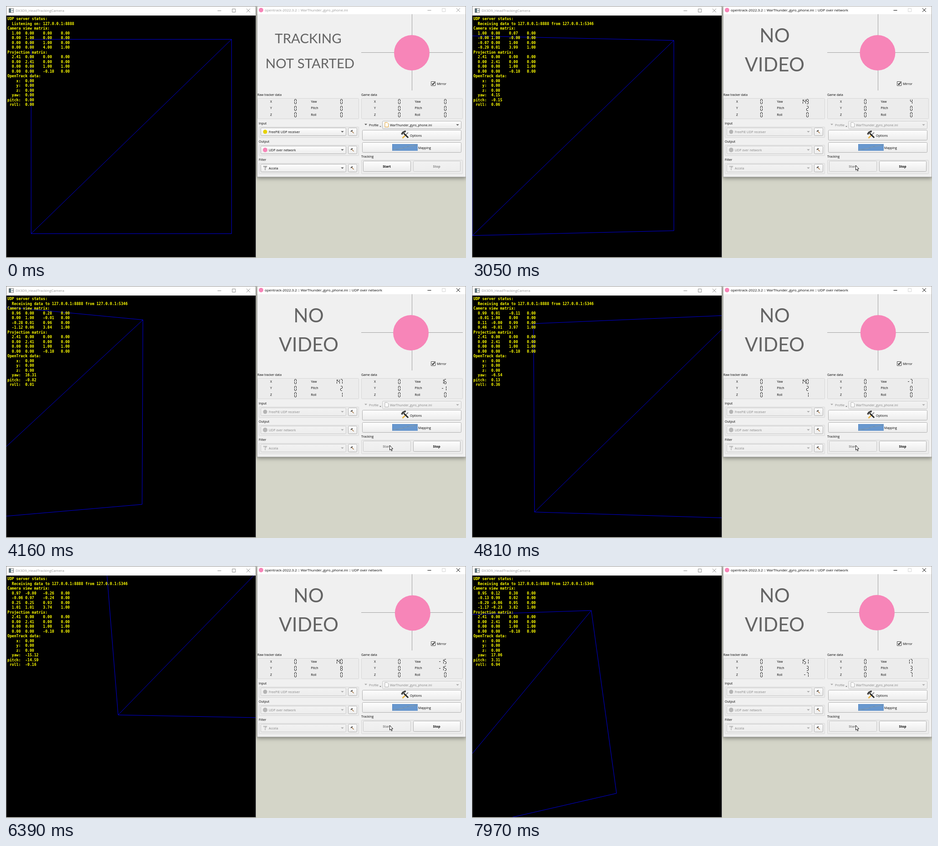
Write an HTML page with a canvas that moves like this. It is 1010 by 555 pixels and loops after 8 s.

```html
<!DOCTYPE html>
<html lang="en">
<head>
<meta charset="utf-8">
<title>Head tracking demo</title>
<style>
html, body { margin: 0; width: 100%; height: 100%; overflow: hidden; background: #d4d5c8; }
canvas { display: block; }
</style>
</head>
<body>
<canvas id="stage" width="1010" height="555"></canvas>
<script>
const ctx = document.getElementById('stage').getContext('2d');
const LOOP = 8000, PRESS = 1940, RUN = 1990, DATA = 2050;
const UI = '"Open Sans", "Noto Sans", sans-serif';
const MONO = '"DejaVu Sans Mono", monospace';
const BIG = 'Lato, sans-serif';
const PINK = '#f785b8';

// time, yaw, pitch, roll, raw yaw, raw pitch, raw roll
const KEYS = [
  [2390, 0, 0, 0, 145, 2, 0],
  [2540, .15, -.02, .03, 145, 2, 0],
  [2900, .15, -.02, .03, 145, 2, 0],
  [3050, 4.13, -.15, .06, 149, 2, 0],
  [3600, 17.4, -.9, .1, 152, 2, 0],
  [3900, 17.5, -.9, .05, 151, 2, 1],
  [4160, 16.33, -.82, .01, 147, 2, 1],
  [4550, 3, -.1, .2, 142, 2, 1],
  [5150, -17, .25, .5, 138, 2, 0],
  [5560, -17.9, -2.26, .44, 140, 3, 0],
  [6150, -15.3, -14, -.1, 140, 8, 0],
  [6390, -15.12, -14.59, -.16, 140, 8, 0],
  [6720, -15.8, 0, 1.2, 139, 0, -2],
  [7070, -16.66, 12.57, 3.04, 138, -5, -5],
  [7520, 1, 9, 5.5, 146, 0, -6],
  [7970, 17.06, 3.31, 6.94, 151, 3, -7]
];

const slope = (i, c) => {
  const a = KEYS[i - 1], b = KEYS[i], d = KEYS[i + 1];
  if (!a || !d || (b[c] - a[c]) * (d[c] - b[c]) <= 0) return 0;
  return (d[c] - a[c]) / (d[0] - a[0]);
};

function pose(t) {
  const last = KEYS.length - 1;
  if (t <= KEYS[0][0]) return KEYS[0].slice(1);
  if (t >= KEYS[last][0]) return KEYS[last].slice(1);
  const i = KEYS.findIndex(k => k[0] > t) - 1;
  const a = KEYS[i], b = KEYS[i + 1], h = b[0] - a[0], u = (t - a[0]) / h;
  return a.slice(1).map((v, n) => {
    const c = n + 1, w = 1 - u;
    return v * (1 + 2 * u) * w * w + b[c] * u * u * (3 - 2 * u) +
      h * u * w * (slope(i, c) * w - slope(i + 1, c) * u);
  });
}

const mix = (a, b, u) => a + (b - a) * Math.min(1, Math.max(0, u));

function rect(x, y, w, h, fill, stroke, r = 0) {
  ctx.beginPath();
  ctx.roundRect(x, y, w, h, r);
  if (fill) { ctx.fillStyle = fill; ctx.fill(); }
  if (stroke) { ctx.strokeStyle = stroke; ctx.lineWidth = 1; ctx.stroke(); }
}
function line(color, width, ...p) {
  ctx.beginPath();
  for (let i = 0; i < p.length; i += 2) ctx.lineTo(p[i], p[i + 1]);
  ctx.strokeStyle = color;
  ctx.lineWidth = width;
  ctx.stroke();
}
function poly(color, ...p) {
  ctx.beginPath();
  for (let i = 0; i < p.length; i += 2) ctx.lineTo(p[i], p[i + 1]);
  ctx.closePath();
  ctx.fillStyle = color;
  ctx.fill();
}
function disc(x, y, r, color) {
  ctx.beginPath();
  ctx.arc(x, y, r, 0, 7);
  ctx.fillStyle = color;
  ctx.fill();
}
function text(s, x, y, size = 7, color = '#000', font = UI, align = 'left', weight = '') {
  ctx.font = `${weight} ${size}px ${font}`;
  ctx.textAlign = align;
  ctx.fillStyle = color;
  ctx.fillText(s, x, y);
}

function titleButtons(x, y, gap, color, boxColor) {
  line(color, 1, x - 4, y + .5, x + 4, y + .5);
  rect(x + gap - 3.5, y - 3.5, 7, 7, null, boxColor);
  const c = x + 2 * gap;
  line(color, 1, c - 4, y - 4, c + 4, y + 4);
  line(color, 1, c + 4, y - 4, c - 4, y + 4);
}

function viewMatrix(yaw, pitch, roll) {
  const [y, p, r] = [yaw, pitch, roll].map(d => d * Math.PI / 180);
  const { sin, cos } = Math;
  const a = [cos(y), 0, sin(y)];
  const b = [-sin(p) * sin(y), cos(p), sin(p) * cos(y)];
  const c = [-cos(p) * sin(y), -sin(p), cos(p) * cos(y)];
  return [
    a.map((v, i) => cos(r) * v + sin(r) * b[i]),
    a.map((v, i) => cos(r) * b[i] - sin(r) * v),
    c,
    c.map(v => 4 * v)
  ];
}

const matrixLines = m => m.map(r => '  ' + r[0].toFixed(2).padEnd(6) +
  r.slice(1).map(v => v.toFixed(2).padEnd(8)).join('').trimEnd());

function leftWindow(t, p) {
  rect(0, 0, 549, 554, '#8c8c8c');
  rect(1, 1, 547, 20, '#fff');
  rect(1, 21, 547, 532, '#000');
  rect(6.5, 5.5, 10, 9, '#fff', '#777');
  rect(7, 6, 4, 8, '#54707c');
  rect(12, 8, 4, 4, '#b9c4c8');
  text('DX3D9_HeadTrackingCamera', 21, 13, 7.88, '#999');
  titleButtons(468.5, 10, 31.8, '#8e8e8e', '#8e8e8e');

  const m = viewMatrix(p[0], p[1], p[2]);
  const project = (x, y) => {
    const [a, b, z] = [0, 1, 2].map(i => x * m[0][i] + y * m[1][i] - m[2][i] + m[3][i]);
    return [275.2 + 660 * a / z, 287.4 - 642 * b / z];
  };
  const tl = project(-1, 1), tr = project(1, 1), br = project(1, -1), bl = project(-1, -1);
  ctx.save();
  ctx.beginPath();
  ctx.rect(1, 21, 547, 532);
  ctx.clip();
  line('#0000e0', 1, ...bl, ...tl, ...tr, ...br, ...bl, ...tr);
  ctx.restore();

  const rows = [
    'UDP server status:',
    t < DATA ? '  Listening on: 127.0.0.1:8888'
      : '  Receiving data to 127.0.0.1:8888 from 127.0.0.1:5346',
    'Camera view matrix:',
    ...matrixLines(m.map((r, i) => [...r, i === 3 ? 1 : 0])),
    'Projection matrix:',
    ...matrixLines([[2.41, 0, 0, 0], [0, 2.41, 0, 0], [0, 0, 1, 1], [0, 0, -.1, 0]]),
    'OpenTrack data:',
    ...['x', 'y', 'z', 'yaw', 'pitch', 'roll'].map((n, i) =>
      (n + ':').padStart(6) + '  ' + (i < 3 ? 0 : p[i - 3]).toFixed(2))
  ];
  rows.forEach((s, i) => text(s, 3, 31 + i * 10.5, 8.15, '#ff0', MONO, 'left', 'bold'));
}

// Seven-segment digits
const SEG = {
  a: [1, 0, 3, 0], b: [4, 1, 4, 4], c: [4, 6, 4, 9], d: [1, 10, 3, 10],
  e: [0, 6, 0, 9], f: [0, 1, 0, 4], g: [1, 5, 3, 5]
};
const GLYPH = {
  0: 'abcdef', 1: 'bc', 2: 'abged', 3: 'abgcd', 4: 'fgbc', 5: 'afgcd',
  6: 'afgedc', 7: 'abc', 8: 'abcdefg', 9: 'abcdfg', '-': 'g'
};
function lcd(value, right, y) {
  const s = String(Math.round(value) || 0);
  [...s].reverse().forEach((ch, i) => {
    const x = right - 4.5 - i * 6;
    for (const k of GLYPH[ch]) {
      const [a, b, c, d] = SEG[k], h = b === d ? .4 : 0, v = h ? 0 : .4;
      line('#222', 1, x + a - h, y - 4.5 + b - v, x + c + h, y - 4.5 + d + v);
    }
  });
}

function frame(x, y, w, h) {
  rect(x + .5, y + .5, w - 1, h - 1, '#ececec', '#d6d6d6', 1);
}
function button(x, y, w, h, o = {}) {
  const g = ctx.createLinearGradient(0, y, 0, y + h);
  g.addColorStop(0, o.pressed ? '#d2d2d2' : o.off ? '#f2f2f2' : '#fefefe');
  g.addColorStop(1, o.pressed ? '#d8d8d8' : o.off ? '#ededed' : '#ebebeb');
  rect(x + .5, y + .5, w - 1, h - 1, g, o.off ? '#c8c8c8' : '#b0b0b0', 2);
  if (o.glow) rect(x + 1, y + 1, w - 2, h - 2, `rgba(255,255,255,${.6 * o.glow})`, null, 1);
}
function arrow(x, y, r, color) {
  poly(color, x - r, y - r / 2, x + r, y - r / 2, x, y + r / 2);
}
function combo(x, y, w, label, tx, off) {
  button(x, y, w, 18, { off });
  text(label, tx, y + 11.5, 7, off ? '#858585' : '#000');
  arrow(x + w - 8.5, y + 9, 3.2, off ? '#a5a5a5' : '#505050');
}
function hammer(x, y, s, handle) {
  line(handle, 1.6 * s, x - s, y - s, x + 4.5 * s, y + 4.5 * s);
  line('#3c3c3c', 2 * s, x - 3.5 * s, y + .5 * s, x - 2 * s, y - 2 * s, x + 1.5 * s, y - 3.5 * s);
}

function dataBox(x, title, p, live) {
  text(title, x, 198, 6.8);
  frame(x, 203, 223, 46);
  ['X', 'Y', 'Z'].forEach((n, i) => {
    const y = 210 + i * 14.6;
    text(n, x + 28, y + 2.5);
    lcd(0, x + 86, Math.round(y));
    text(['Yaw', 'Pitch', 'Roll'][i], x + 117.5, y + 2.5);
    lcd(live ? p[i] : 0, x + 187, Math.round(y));
  });
}

function inputRow(y, title, label, off, icon) {
  text(title, 555, y + 2.5);
  frame(555, y + 8, 220, 24);
  combo(559, y + 10, 188, label, 577, off);
  icon(569, y + 19);
  button(751, y + 10, 20, 18);
  hammer(760, y + 18.5, .8, '#a06a32');
}

function rightWindow(t, p) {
  const run = t >= RUN, live = t >= DATA;
  const ink = run ? '#000' : '#999', dim = run ? '#858585' : '#000';
  ctx.save();
  ctx.shadowColor = 'rgba(0,0,0,.45)';
  ctx.shadowBlur = 9;
  ctx.shadowOffsetY = 2;
  rect(551, 0, 459, 377, '#a8a8a8');
  ctx.restore();
  rect(552, 1, 457, 375, '#f0f0f0');
  rect(552, 1, 457, 17, '#fff');
  disc(560, 9, 5, PINK);
  text('opentrack-2022.3.2 :: WarThunder_gyro_phone.ini' + (run ? ' :: UDP over network' : ''),
    568, 12, 7.88, ink);
  titleButtons(929.5, 9, 31.7, ink, '#d4d4d4');

  if (run) {
    text('NO', 664.5, 79.5, 42.5, '#646464', BIG, 'center');
    text('VIDEO', 664.5, 143.5, 42.5, '#646464', BIG, 'center');
  } else {
    text('TRACKING', 663.5, 82, 29.4, '#646464', BIG, 'center');
    text('NOT STARTED', 667.5, 137, 29.4, '#646464', BIG, 'center');
  }

  line('#a0a0a0', 1, 891.5, 18, 891.5, 186);
  line('#a0a0a0', 1, 780, 102.5, 1003, 102.5);
  disc(891 - p[0] * .12, 103 - p[1] * .04, 39, PINK);

  rect(933.5, 166.5, 9, 9, '#fff', '#444');
  line('#000', 1.5, 935.5, 171, 937.3, 173.3, 941, 168);
  text('Mirror', 946, 174);

  dataBox(552, 'Raw tracker data', p.slice(3), live);
  dataBox(780, 'Game data', p, live);

  inputRow(258, 'Input', 'FreePIE UDP receiver', run,
    (x, y) => disc(x, y, 4.5, run ? '#b4b4b4' : '#e6d200'));
  inputRow(298, 'Output', 'UDP over network', run,
    (x, y) => disc(x, y, 5, run ? '#b8b8b8' : PINK));
  inputRow(338, 'Filter', 'Accela', run, (x, y) => {
    poly(run ? '#c0c0c0' : '#a8a8a8', x - 5, y - 5, x + 5, y - 5, x + 1, y + 1, x + 1, y + 5, x - 1, y + 4, x - 1, y + 1);
    line('#fff', 1, x - 2, y - 3, x, y + 1);
  });

  arrow(790, 261, 3, run ? '#a5a5a5' : '#505050');
  text('Profile', 797, 264.5, 7, dim);
  arrow(822, 265.5, 2, '#606060');
  combo(826, 253, 174, 'WarThunder_gyro_phone.ini', 843, run);
  ctx.beginPath();
  [[832, 256.5], [837, 256.5], [839.5, 259], [839.5, 266.5], [832, 266.5]].forEach(q => ctx.lineTo(...q));
  ctx.closePath();
  ctx.fillStyle = '#fff';
  ctx.fill();
  ctx.strokeStyle = run ? '#b0b0b0' : '#e0a030';
  ctx.lineWidth = 1;
  ctx.stroke();

  button(782, 273, 218, 23);
  line('#e8b23c', 2.6, 870.5, 291, 876, 285.5);
  line('#8a8a8a', 2, 876, 285.5, 883, 278.5);
  hammer(875, 282, 1.8, '#222');
  text('Options', 887, 287.5);

  button(782, 300, 218, 23);
  rect(848, 304, 56, 15, '#4f86c6');
  for (let x = 851; x < 904; x += 3) line('rgba(255,255,255,.22)', 1, x + .5, 304, x + .5, 319);
  for (let y = 306; y < 319; y += 3) line('rgba(255,255,255,.22)', 1, 848, y + .5, 904, y + .5);
  line('rgba(150,150,130,.6)', 1, 849, 317, 868, 314, 884, 309, 903, 306);
  text('Mapping', 905, 314.5, 6.8);

  text('Tracking', 780, 333.5);
  frame(780, 339, 223, 31);
  button(784, 341, 105, 24, {
    off: run, pressed: t >= PRESS && !run, glow: run ? 0 : mix(0, 1, (t - 1060) / 350)
  });
  text('Start', 836, 355.5, 7.1, run ? '#858585' : '#000', UI, 'center', 'bold');
  button(894, 341, 104, 24, { off: !run });
  text('Stop', 945.5, 355.5, 7.1, run ? '#000' : '#858585', UI, 'center', 'bold');
}

function cursor(t) {
  if (t < 770) return;
  const u = (t - 770) / 90, v = (t - 1060) / 90;
  ctx.save();
  ctx.translate(t < 1060 ? mix(979, 840, u) : mix(840, 842, v),
    t < 1060 ? mix(369, 333.5, u) : mix(333.5, 350.5, v));
  ctx.beginPath();
  [[.5, .5], [.5, 11], [2.8, 8.8], [4.3, 12.6], [6, 11.9], [4.5, 8.2], [7.6, 8]]
    .forEach(q => ctx.lineTo(...q));
  ctx.closePath();
  ctx.fillStyle = '#fff';
  ctx.fill();
  ctx.strokeStyle = '#000';
  ctx.lineWidth = .9;
  ctx.stroke();
  ctx.restore();
}

function draw(t) {
  rect(0, 0, 1010, 555, '#d4d5c8');
  const p = pose(t);
  rightWindow(t, p);
  leftWindow(t, p);
  cursor(t);
}

const start = performance.now();
function tick(now) {
  draw(Math.max(0, now - start) % LOOP);
  requestAnimationFrame(tick);
}
draw(0);
requestAnimationFrame(tick);
</script>
</body>
</html>
```
